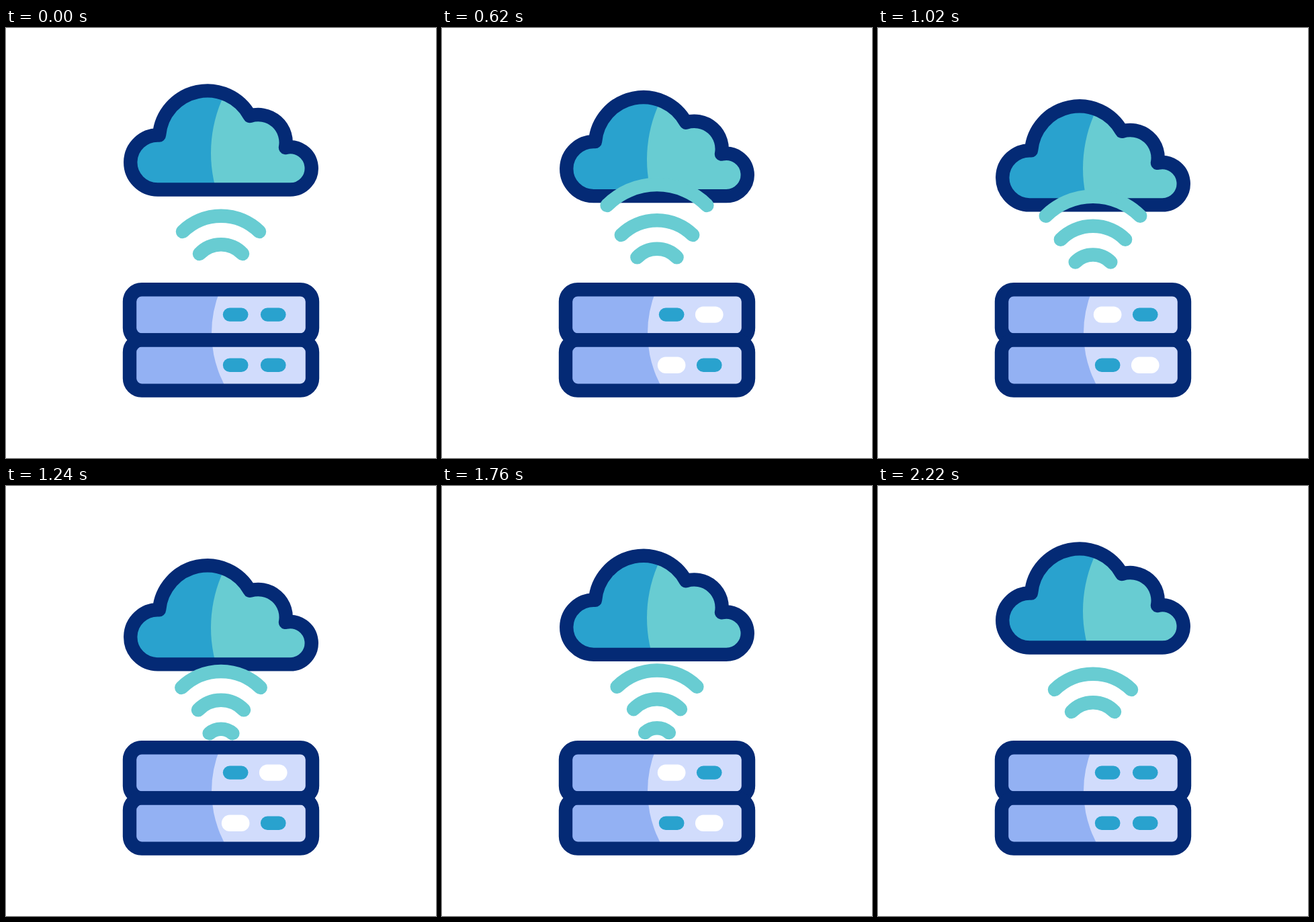
An HTML page that plays this animation: 640x640 px, repeating every 2.4 s.

```html
<!DOCTYPE html>
<html lang="en">
<head>
<meta charset="utf-8">
<title>Cloud server</title>
<style>
  html, body { margin: 0; height: 100%; overflow: hidden; background: #fff; }
  svg { display: block; width: 100vw; height: 100vh; }
</style>
</head>
<body>
<svg viewBox="0 0 640 640" fill="none" stroke-width="20.4" stroke-linecap="round" stroke-linejoin="round">
  <defs>
    <path id="shape" d="M226 240.5A40.53 40.53 0 1 1 228 159.5A72 72 0 0 1 363 131A41.3 41.3 0 0 1 416 178A31.65 31.65 0 1 1 423 240.5Z"/>
    <rect id="box" x="184" y="389.2" width="272" height="75.2" rx="18"/>
    <clipPath id="inCloud"><use href="#shape"/></clipPath>
    <clipPath id="inBoxes"><use href="#box"/><use href="#box" y="75.2"/></clipPath>
  </defs>
  <g id="cloud">
    <use href="#shape" fill="#29a2ce"/>
    <circle cx="505" cy="186" r="200" fill="#68ccd2" clip-path="url(#inCloud)"/>
    <use href="#shape" stroke="#042a75"/>
  </g>
  <path id="waves" stroke="#68ccd2" stroke-width="20.5"/>
  <g clip-path="url(#inBoxes)">
    <rect x="184" y="389" width="272" height="151" fill="#93b1f3"/>
    <circle cx="471" cy="454" r="165" fill="#d1dcfc"/>
  </g>
  <g stroke="#042a75"><use href="#box"/><use href="#box" y="75.2"/></g>
  <g id="lights">
    <path d="M333 426.6h17.3"/><path d="M389.1 426.6h17.3"/>
    <path d="M333 501.8h17.3"/><path d="M389.1 501.8h17.3"/>
  </g>
</svg>
<script>
const LOOP = 2400, START = 195, SPAN = 2010, PULSES = 4;
const $ = id => document.getElementById(id);
const lights = [...$('lights').children];

// Wave stages: half width, y of the ends, y of the crest
const stages = [[16, 371, 365.2], [32, 336, 322.2], [57, 303, 279.7], [77.5, 267, 234.7]];

function arc(stage, p, lift) {
  const [w, y, top] = stages[stage].map((v, i) => v + (stages[stage + 1][i] - v) * p);
  const sag = y - top, r = (w * w + sag * sag) / (2 * sag);
  return `M${320 - w} ${y - lift}A${r} ${r} 0 0 1 ${320 + w} ${y - lift}`;
}

function draw(t) {
  const s = (t - START) / SPAN;
  const active = s >= 0 && s < 1;
  const pulse = active ? Math.floor(s * PULSES) : 0;
  const p = active ? s * PULSES - pulse : 0;

  const k = active ? 1 - Math.abs(2 * s - 1) : 0;
  $('cloud').setAttribute('transform', `translate(0 ${25 * k * k * (3 - 2 * k)})`);

  // The first pulse carries its outer wave a little higher
  $('waves').setAttribute('d', [0, 1, 2].slice(active ? 0 : 1).map(i =>
    i || active ? arc(active ? i : i, p, i === 2 && pulse === 0 ? 10 * p : 0) : '').join('')
    .replace(/^$/, ''));
  if (!active) $('waves').setAttribute('d', arc(1, 0, 0) + arc(2, 0, 0));

  lights.forEach((light, i) => {
    const diagonal = i === 0 || i === 3;
    const lit = active && diagonal === (pulse % 2 === 1);
    light.setAttribute('stroke', lit ? '#fff' : '#29a2ce');
    light.setAttribute('stroke-width', lit ? 24.4 : 20.4);
  });
}

const begin = performance.now();
function tick() {
  draw((performance.now() - begin) % LOOP);
  requestAnimationFrame(tick);
}
tick();
</script>
</body>
</html>
```
